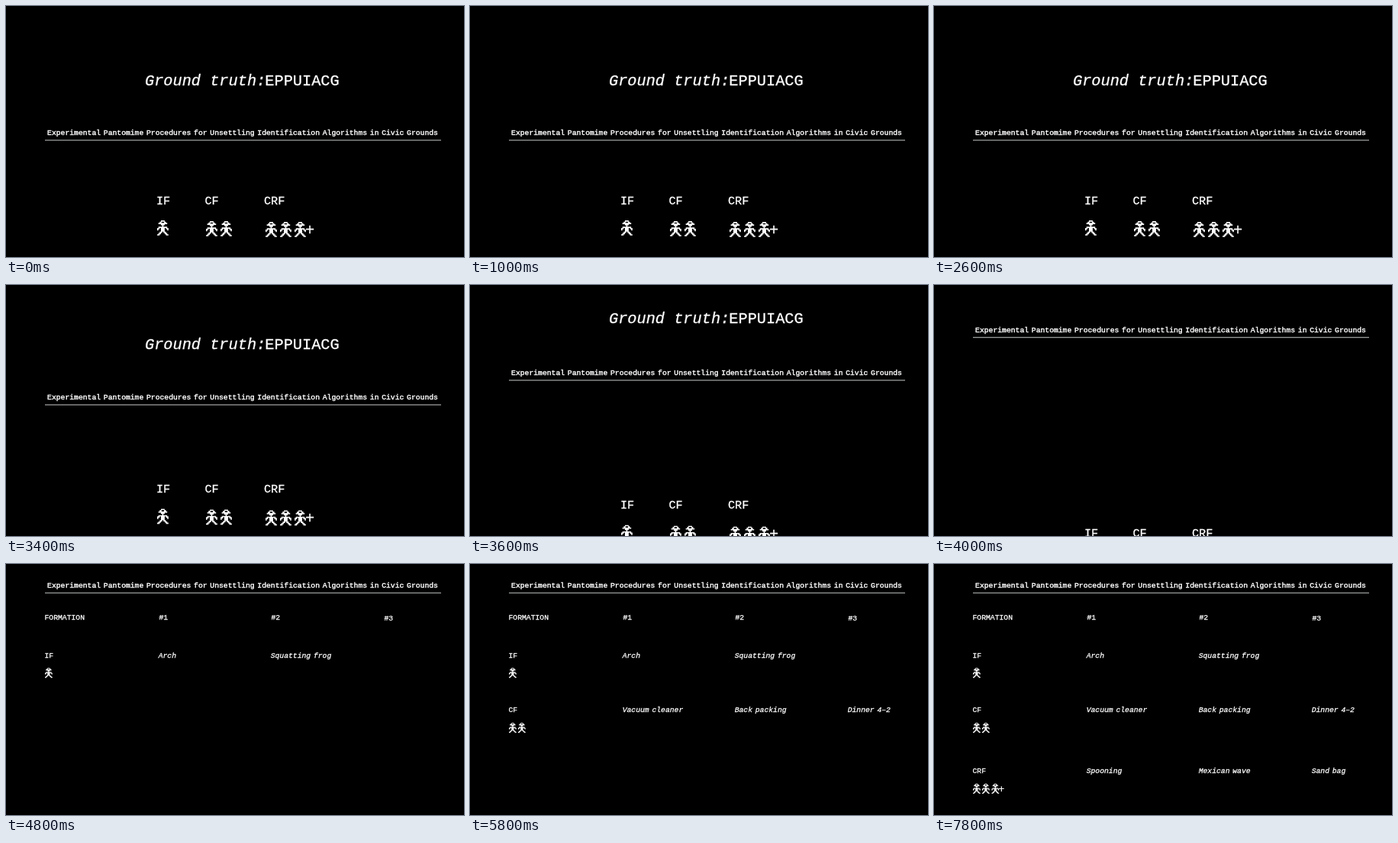
These frames come from a looping animation (600x329 px, 8 s). An HTML page:

```html
<!DOCTYPE html>
<html lang="en">
<head>
<meta charset="utf-8">
<title>Formations</title>
<style>
html, body { margin: 0; width: 100%; height: 100%; overflow: hidden; background: #000; }
svg { display: block; width: 100%; height: 100%; }
text {
  font-family: "Liberation Mono", "DejaVu Sans Mono", monospace;
  font-variant-ligatures: none;
  white-space: pre;
  fill: #fff;
  stroke: #fff;
  stroke-width: .3;
}
.big { font-size: 20.3px; }
.mid { font-size: 15.2px; }
.small { font-size: 9.72px; word-spacing: -2.1px; }
.title { stroke-width: .42; }
.it { font-style: italic; }
</style>
</head>
<body>
<svg id="stage" viewBox="0 0 600 329">
  <rect width="600" height="329"/>
</svg>
<script>
const NS = "http://www.w3.org/2000/svg";
const LOOP = 8000, STEP = 200;
const SCROLL_START = 3200;
const SCROLL = [0, .137, .37, .54, .777, 1];
const MAN = "M3 0H6V1H7V2H8V3H6V4H5V5H8V6H9V8H8V7H7V6H6V9H7V10H8V11H9V12H7V11H6V10H5V9H4V10" +
  "H3V11H2V12H0V11H1V10H2V9H3V6H2V7H1V8H0V6H1V5H4V4H3V3H1V2H2V1H3ZM3.5 1V2H5.5V1Z";

function add(parent, tag, attrs = {}, content = "") {
  const el = document.createElementNS(NS, tag);
  for (const key in attrs) el.setAttribute(key, attrs[key]);
  el.textContent = content;
  return parent.appendChild(el);
}

const stage = document.getElementById("stage");
const group = () => add(stage, "g");
const label = (g, x, y, cls, str, anchor = "start") =>
  add(g, "text", { x, y, class: cls, "text-anchor": anchor }, str);

function men(g, xs, y, unit) {
  for (const x of xs) {
    add(g, "path", {
      d: MAN, fill: "#fff", "fill-rule": "evenodd",
      transform: `translate(${x} ${y}) scale(${unit})`
    });
  }
}

// Opening screen
const heading = group();
label(heading, 182, 104, "big it", "Ground truth:");
label(heading, 339.3, 104, "big", "EPPUIACG");

const banner = group();
label(banner, 310, 169, "small title",
  "Experimental Pantomime Procedures for Unsettling Identification Algorithms in Civic Grounds", "middle");
add(banner, "rect", { x: 51, y: 175.4, width: 519, height: 1.1, fill: "#b4b8b6" });

const legend = group();
label(legend, 197, 259.5, "mid", "IF");
label(legend, 260.5, 259.5, "mid", "CF");
label(legend, 338, 259.5, "mid", "CRF");
men(legend, [198], 281, 1.65);
men(legend, [262, 281], 282, 1.65);
men(legend, [340, 359, 378], 283, 1.65);
label(legend, 398, 299.6, "big", "+", "middle");

// Table parts, each with the time it appears
const parts = [];
function part(from) {
  const el = group();
  parts.push({ el, from });
  return el;
}

const COLS = [199.7, 346.7, 494.7];

const head = part(4400);
label(head, 50.5, 73, "small", "FORMATION");
COLS.forEach((x, i) => label(head, x + .8, i < 2 ? 73 : 74, "small", "#" + (i + 1)));

function row(from, y, code, xs, top, names) {
  const g = part(from);
  label(g, 50.5, y, "small", code);
  men(g, xs, top, 1.08);
  names.forEach((name, i) => label(g, COLS[i], y, "small it", name));
  return g;
}

row(4400, 123, "IF", [51], 136.2, ["Arch"]);
label(part(4800), COLS[1], 123, "small it", "Squatting frog");
row(5600, 194, "CF", [51, 63], 208.2, ["Vacuum cleaner", "Back packing", "Dinner 4–2"]);
const last = row(6800, 273.7, "CRF", [51, 63, 75.5], 288, ["Spooning", "Mexican wave", "Sand bag"]);
label(last, 88.5, 299, "small", "+", "middle").style.fontSize = "13px";

const shift = (el, y) => el.setAttribute("transform", `translate(0 ${y})`);

function draw(time) {
  const t = Math.floor(time % LOOP / STEP) * STEP;
  const i = Math.min(SCROLL.length - 1, Math.max(0, (t - SCROLL_START) / STEP));
  const p = SCROLL[i];
  shift(heading, -147 * p);
  shift(banner, -138 * p);
  shift(legend, 91 * p);
  for (const { el, from } of parts) {
    el.setAttribute("visibility", t >= from ? "visible" : "hidden");
  }
}

const start = performance.now();
function tick() {
  draw(performance.now() - start);
  requestAnimationFrame(tick);
}
tick();
</script>
</body>
</html>
```
